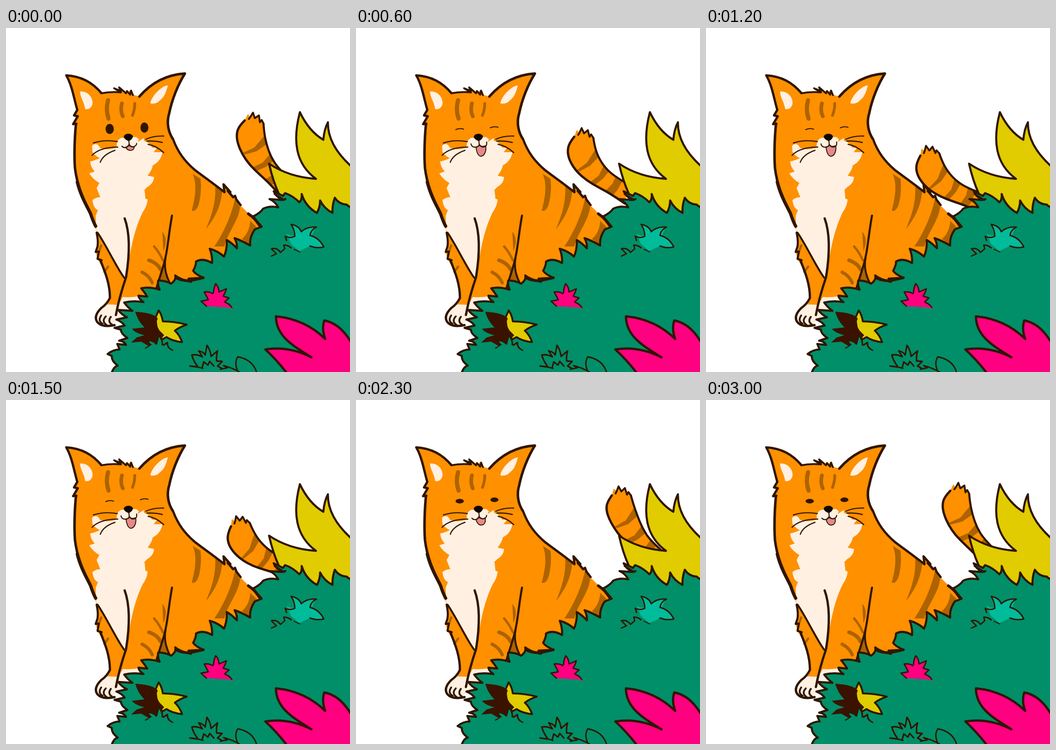
Animation, 748 px wide and 748 px high, one loop 3100 ms. Source, as an HTML page with a canvas:

```html
<!DOCTYPE html>
<html lang="en">
<head>
<meta charset="utf-8">
<title>Cat behind a bush</title>
<style>
html, body { margin: 0; width: 100%; height: 100%; overflow: hidden; background: #fff; }
canvas { display: block; width: 748px; height: 748px; }
</style>
</head>
<body>
<canvas id="stage" width="748" height="748"></canvas>
<script>
const ctx = document.getElementById('stage').getContext('2d');
const INK = '#301600', ORANGE = '#ff9000', CREAM = '#fff0e1', STRIPE = '#ad6300';
const GREEN = '#008f68', YELLOW = '#e0cc00', PINK = '#ff0080', TEAL = '#00bc9b';
const LOOP = 3100, STEP = 100;
ctx.lineCap = ctx.lineJoin = 'round';

function fill(d, color) {
  ctx.fillStyle = color;
  ctx.fill(new Path2D(d));
}
function line(d, width = 4, color = INK) {
  ctx.strokeStyle = color;
  ctx.lineWidth = width;
  ctx.stroke(new Path2D(d));
}
function shape(d, color, width = 4) {
  fill(d, color);
  line(d, width);
}

// time, x, y, tip angle, base angle
const tailKeys = [
  [0, 541, 254, 0, 0],
  [400, 516, 270, -3, -11],
  [900, 489, 312, -12, -17],
  [1500, 528, 317, -20, -26],
  [1900, 566, 281, -21, -14],
  [2300, 587, 256, -10, -2],
  [3000, 554, 250, -1, 1]
];

function keyAt(i) {
  const n = tailKeys.length, turn = Math.floor(i / n);
  const [t, ...rest] = tailKeys[i - turn * n];
  return [t + turn * LOOP, ...rest];
}

// Periodic Hermite interpolation over unevenly spaced keys.
function tailPose(t) {
  let i = tailKeys.length - 1;
  while (tailKeys[i][0] > t) i--;
  const [a, b, c, d] = [i - 1, i, i + 1, i + 2].map(keyAt);
  const span = c[0] - b[0], u = (t - b[0]) / span;
  const slope = (p, q, r, k) => {
    const h = q[0] - p[0], g = r[0] - q[0];
    return ((q[k] - p[k]) / h * g + (r[k] - q[k]) / g * h) / (h + g);
  };
  return [1, 2, 3, 4].map(k =>
    (2 * u ** 3 - 3 * u * u + 1) * b[k] + (3 * u * u - 2 * u ** 3) * c[k] +
    span * ((u ** 3 - 2 * u * u + u) * slope(a, b, c, k) + (u ** 3 - u * u) * slope(b, c, d, k)));
}

const tailLeft = [[598, 366], [575, 340], [552, 319], [530, 298], [514, 275], [504, 252], [501, 232], [506, 214], [519, 201]];
const tailTuft = [[526, 187], [531, 194], [537, 184], [541, 196], [550, 190], [552, 205], [556, 200], [560, 208]];
const tailRight = [[560, 208], [561, 225], [566, 252], [576, 280], [592, 305], [616, 328]];
const tailStripes = [
  [[514, 272], [540, 260], [562, 234], [566, 253], [545, 268], [520, 275]],
  [[536, 303], [558, 293], [573, 275], [582, 289], [565, 302], [545, 311]],
  [[564, 329], [582, 318], [592, 305], [605, 317], [588, 335], [577, 342]]
];

function smooth(points) {
  let d = '';
  for (let i = 1; i < points.length - 1; i++) {
    const [x, y] = points[i], [nx, ny] = points[i + 1];
    const last = i === points.length - 2;
    d += `Q${x} ${y} ${last ? nx : (x + nx) / 2} ${last ? ny : (y + ny) / 2}`;
  }
  return d;
}

function drawTail(t) {
  const [px, py, tip, base] = tailPose(t);
  const bend = ([x, y]) => {
    x -= 541; y -= 254;
    const mix = Math.min(1, Math.max(0, (y + 40) / 80));
    const a = (tip + (base - tip) * mix) * Math.PI / 180;
    return [px + x * Math.cos(a) - y * Math.sin(a), py + x * Math.sin(a) + y * Math.cos(a)];
  };
  const left = tailLeft.map(bend), tuft = tailTuft.map(bend), right = tailRight.map(bend);
  const leftPath = `M${left[0]}` + smooth(left);
  const rightPath = smooth(right);
  fill(`${leftPath}L${tuft.join('L')}${rightPath}Z`, ORANGE);
  for (const s of tailStripes) fill(`M${s.map(bend).join('L')}Z`, STRIPE);
  line(leftPath, 5);
  line(`M${bend([528, 198])}L${tuft.slice(1).join('L')}`, 4);
  line(`M${right[0]}${rightPath}`, 4.5);
}

function drawBody() {
  fill(`M131 103C165 105 188 119 207 141Q224 137 249 138L246 131 262 142 270 135 276 145
    290 149C310 126 340 102 389 99C374 123 361 155 355 185C348 207 354 227 363 241
    C374 271 389 290 411 309C435 327 452 339 475 357L473 340 488 357 494 369 501 372
    511 388 551 430 520 500 400 580 300 640 242 632C226 651 206 653 197 639
    C191 625 202 610 220 602C230 584 224 555 214 529L199 502 195 487 199 470 197 445
    193 429C160 365 148 340 149 290Q149 242 153 210L147 208 156 192 148 190 155 178
    C148 155 144 125 131 103Z`, ORANGE);

  fill(`M187 257Q192 250 200 254L205 261Q224 267 241 259Q239 245 250 239L283 237 289 242
    286 248 300 239Q298 248 307 247L318 260 328 261 321 270 340 270Q338 284 328 293L319 299
    Q318 308 308 321L322 324Q321 338 307 346L301 352Q303 366 303 371L308 373Q307 387 297 401
    C285 426 276 455 270 490L258 543C240 510 220 475 196 440L195 408 200 396Q190 392 188 374
    Q197 367 205 368L197 348 203 337Q189 329 181 316L193 312Q184 303 183 290Q191 289 204 283
    Q191 276 188 269Z`, CREAM);
  fill('M222 601L244 602 254 585Q278 587 304 580L304 640 238 636Q222 651 207 646Q193 641 197 623Q202 610 222 601Z', CREAM);
  fill('M161 138C178 137 190 151 188 166Q183 179 172 176C170 160 161 151 161 138Z', CREAM);
  fill('M352 125C341 124 316 147 314 164Q327 166 334 158C346 149 348 138 352 125Z', CREAM);

  line('M222 157Q216 177 223 197', 9, STRIPE);
  line('M252 164Q248 180 254 192', 8, STRIPE);
  line('M280 164Q280 178 275 190', 6, STRIPE);
  fill('M406 317C417 343 410 373 404 397Q414 401 420 380Q426 353 423 328Z', STRIPE);
  fill('M455 343L470 355C467 391 451 417 435 437C445 412 457 383 455 343Z', STRIPE);
  fill('M498 371L509 390C505 421 481 446 475 475L453 475C470 451 490 410 498 371Z', STRIPE);
  fill('M511 387L529 405 514 430 495 462 480 470C496 435 510 415 511 387Z', ORANGE);
  fill('M531 419Q530 444 513 459L531 473 546 434Z', STRIPE);
  fill('M340 443C350 455 349 471 342 485Q341 464 340 443Z', STRIPE);
  line('M322 475Q333 487 341 505', 5, STRIPE);
  line('M311 505Q329 511 336 525', 8, STRIPE);
  line('M296 531Q311 538 318 554', 7, STRIPE);
  fill('M344 514L328 564 356 552Z', STRIPE);
  line('M207 473L202 487M222 519L214 530', 5, STRIPE);

  line('M207 141C188 119 165 105 131 103C144 125 148 155 155 178L148 190 156 192 146 209 153 208', 5);
  line('M152 210C149 240 148 280 150 305C155 345 169 372 181 398', 5.5);
  line('M155 335C162 365 177 389 184 404Q189 420 195 431', 7);
  line('M207 142Q227 138 250 140L235 131 250 137 246 129 261 142 263 137 270 145 272 136 276 146', 4);
  line('M290 149C310 126 340 102 389 99C374 123 361 155 355 185C348 207 354 227 362 240', 5.5);
  line('M363 241C374 271 389 290 411 309C435 327 452 339 475 357L473 340 488 357 482 354 494 368 498 365 501 373 510 385', 5);
  line('M527 404Q542 414 552 430', 6);
  line('M197 445Q201 463 199 475L195 487 202 486 199 502 208 505', 4.5);
  line('M206 507C216 532 226 557 226 587Q219 601 207 609Q189 627 199 640Q210 652 236 646', 5);
  line('M199 445C220 475 237 516 257 543', 4);
  line('M258 414C272 452 267 505 261 542Q246 586 239 624', 5);
  line('M361 408C353 450 352 487 341 521L327 566', 4.5);
  line('M347 500Q342 527 356 554', 4);
  line('M207 625Q199 637 210 643M217 627Q207 638 219 646M228 628Q220 639 231 645', 4);
}

function drawFace(mood) {
  ctx.fillStyle = INK;
  const eye = (x, y, rx, ry, tilt) => {
    ctx.beginPath();
    ctx.ellipse(x, y, rx, ry, tilt, 0, 7);
    ctx.fill();
  };
  if (mood === 2) {
    line('M217 221Q225 217 234 220M292 217Q301 213 309 216', 2);
  } else {
    eye(225.5, mood ? 220 : 219.5, 9, mood ? 5 : 11, 0);
    eye(301, mood ? 217 : 216.5, 8.7, mood ? 5 : 11, 0);
  }
  const tongue = [
    'M260 259Q266 258 268 255Q273 260 279 258Q278 267 269 266Q263 265 260 259Z',
    'M261 260Q266 258 268 255Q273 260 281 257Q283 272 271 272Q264 271 261 260Z',
    'M261 259Q266 258 268 254Q273 260 282 256C284 268 279 279 271 279Q263 277 261 259Z'
  ][mood];
  shape(tongue, '#e48a8a', 2);
  line(mood === 2 ? 'M250 252Q252 260 260 259Q268 258 268 253Q274 262 282 257Q285 254 284 248'
                  : 'M252 257Q256 262 263 259L268 253Q273 261 280 257Q284 255 284 251', 2.3);
  line('M267 243L268 254', 2.3);
  fill('M256 237C257 228 274 228 276 236Q275 242 267 246Q258 243 256 237Z', '#100700');
  line('M190 250Q214 242 242 247M187 277Q204 259 243 259M205 292Q211 275 237 266', 2.4);
  line('M304 242Q321 234 343 235M306 246Q324 245 340 249M309 253Q327 256 343 271', 2.4);
}

function drawPlants() {
  const leaf = `M593 360Q580 331 572 295Q615 324 674 328C629 295 623 245 639 183
    Q659 225 690 243Q692 220 700 205Q699 255 752 302`;
  fill(leaf + 'V420H600Z', YELLOW);
  line(leaf, 4.5);

  const bush = `M229 752Q234 736 243 734Q229 724 230 713L221 709Q233 699 247 699L242 687 261 689
    Q257 681 246 680L264 674Q249 664 250 656L236 652 258 647Q251 638 240 634L263 629
    Q251 623 244 613L275 615Q264 607 257 597Q276 592 299 596Q288 588 288 582L307 584
    Q300 573 294 566Q312 562 334 569Q329 559 331 549Q347 549 359 556Q371 547 368 538
    Q379 547 402 552Q398 547 397 545L429 543Q411 535 407 528Q414 514 413 508
    Q428 499 448 511Q449 495 443 480Q461 485 474 497Q481 481 480 461Q492 468 502 479
    Q503 468 497 457Q512 462 531 473Q529 455 541 438L556 432 537 410Q553 402 559 393
    Q573 386 592 390Q585 377 573 372L601 374Q587 367 582 355L602 365 607 359
    Q624 365 638 379Q644 373 643 361Q651 388 676 402Q683 390 683 375Q692 393 710 402
    Q709 386 715 369Q724 383 741 384Q745 389 752 390`;
  fill(bush + 'V752Z', GREEN);
  line(bush, 4.5);
  line('M537 410L552 430M369 543Q386 551 402 549L429 543', 6);
  line('M584 361L605 374M597 374L608 372', 4);

  const teal = 'M610 447Q619 454 627 451L621 427Q637 430 642 441Q656 431 675 433Q667 443 665 454Q682 458 691 475Q674 479 661 474';
  fill(teal + 'L638 485 620 470Z', TEAL);
  line('M610 462L607 453Q618 458 628 453Q628 439 620 427Q637 430 642 443Q655 431 675 433Q662 440 661 451Q681 456 691 476Q677 480 661 474', 3);
  line('M577 496L588 491 577 480Q589 477 597 488L606 480 604 472Q613 472 620 478', 3);
  line('M626 481L639 487', 2);

  shape('M436 605L424 594 440 591 431 574Q446 573 451 579Q451 566 456 556Q463 563 463 574L479 567Q477 576 472 583L485 587 475 596Q487 600 491 608', PINK, 3);
  fill('M437 605L451 577 464 575 474 596 495 612Q466 599 437 605Z', PINK);

  shape('M325 630L332 614Q339 624 341 638Q366 638 393 645Q378 650 367 658Q377 667 383 683Q362 681 349 672L340 677 329 663Z', YELLOW, 4);
  fill('M281 617Q321 619 330 632Q324 643 334 658L344 668 333 680 311 692 294 682 272 684 284 673 301 668Q280 663 274 654L301 651Q287 638 281 617Z', '#3b1200');
  shape('M304 696L316 690Q308 684 309 679Q321 680 327 687L332 668Q341 677 340 691L351 684Q350 695 362 701', GREEN, 3.5);
  fill('M303 698L318 688 340 690 365 704 330 705Z', GREEN);

  line('M400 735L416 737 428 740M416 735Q407 723 404 711Q416 709 427 715L419 702Q429 704 433 711L437 690Q444 699 446 714L460 702Q457 713 458 724L470 725 460 735 469 740', 3.3);
  line('M427 737L430 726 439 733 443 725 452 735', 3.3);
  line('M466 742L481 739 473 734Q493 739 511 750M503 744Q496 728 504 715Q538 721 546 752', 3);

  shape('M612 752Q589 722 564 699Q615 691 664 716C622 690 587 669 587 627Q650 633 694 676Q686 654 692 636Q727 642 752 686V752Z', PINK, 5);
}

// 0: eyes open, 1: half shut, 2: laughing
function moodAt(t) {
  if (t < 100) return 0;
  return t < 300 || t >= 2200 ? 1 : 2;
}

function frame(now) {
  const t = Math.floor(now % LOOP / STEP) * STEP;
  ctx.fillStyle = '#fff';
  ctx.fillRect(0, 0, 748, 748);
  drawTail(t);
  drawBody();
  drawFace(moodAt(t));
  drawPlants();
}

let start;
function tick(now) {
  start ??= now;
  frame(now - start);
  requestAnimationFrame(tick);
}
frame(0);
requestAnimationFrame(tick);
</script>
</body>
</html>
```
